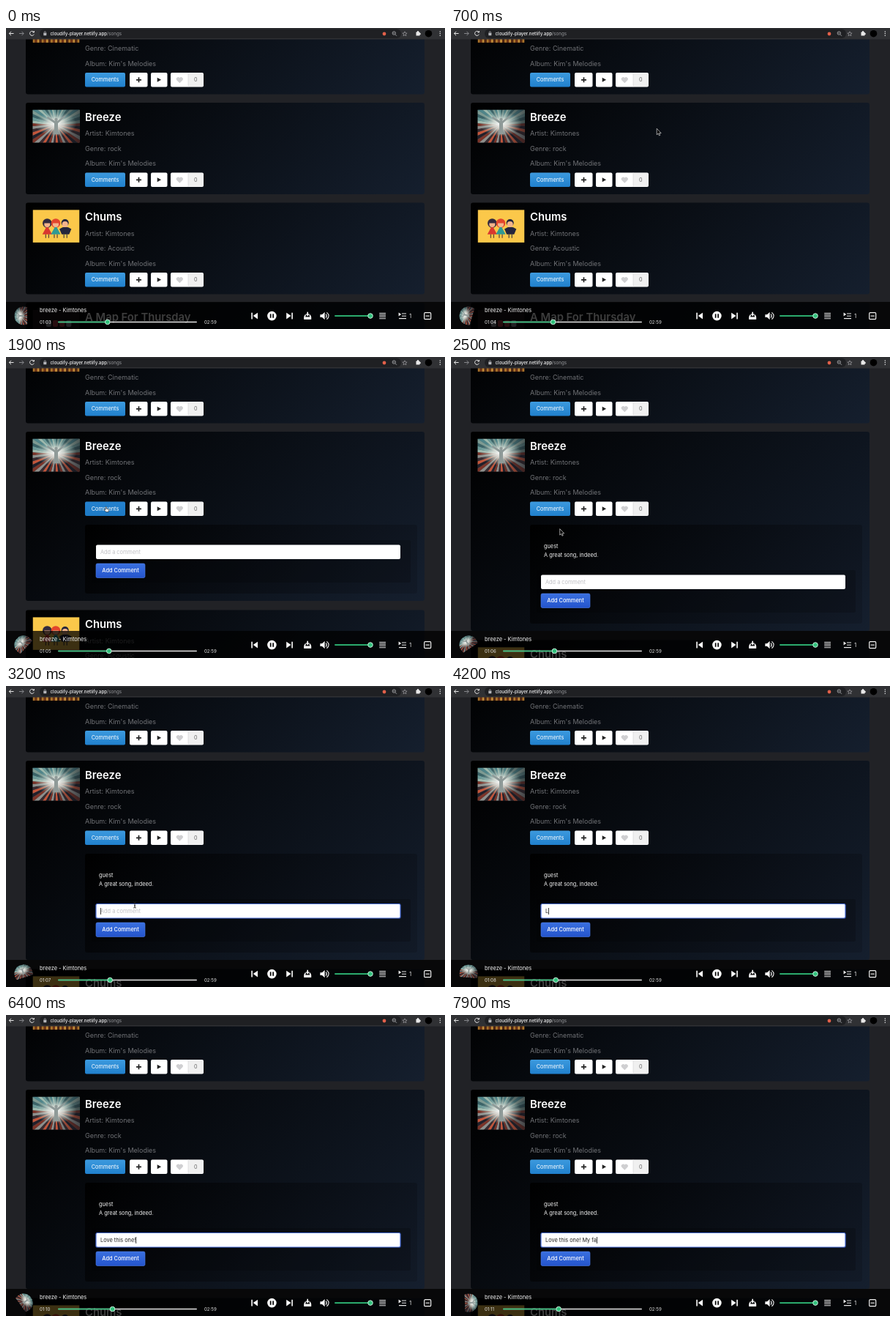
Write an HTML page that moves like this. It is 600 px wide and 411 px high and loops after 8000 ms.

```html
<!DOCTYPE html>
<html lang="en">
<head>
<meta charset="utf-8">
<title>Music player</title>
<style>
html, body { margin: 0; width: 100%; height: 100%; overflow: hidden; background: #212226; }
svg { display: block; }
text { font-family: Inter, "Open Sans", sans-serif; white-space: pre; }
.line { fill: none; stroke: #e8e8e8; stroke-width: 1; }
</style>
</head>
<body>
<svg id="stage" width="600" height="411" viewBox="0 0 600 411"></svg>
<script>
const LOOP = 8000, STEP = 100;
const OPENED = 1900, LOADED = 2200, FOCUSED = 2900, TYPING = 4100;
const ARTIST = 'Kimtones', ALBUM = "Kim's Melodies";
const MESSAGE = 'Love this one! My fa';
const TRACK = { x: 71, width: 190, length: 179, start: 63.85 };

const range = n => [...Array(n).keys()];

// y is the middle of the capital letters
const text = (x, y, size, fill, str, attrs = '') =>
  `<text x="${x}" y="${y + size * .364}" font-size="${size}" fill="${fill}" ${attrs}>${str}</text>`;
const rect = (x, y, w, h, fill, rx = 0, attrs = '') =>
  `<rect x="${x}" y="${y}" width="${w}" height="${h}" rx="${rx}" fill="${fill}" ${attrs}/>`;
const circle = (x, y, r, fill, attrs = '') =>
  `<circle cx="${x}" cy="${y}" r="${r}" fill="${fill}" ${attrs}/>`;
const path = (d, fill, attrs = '') => `<path d="${d}" fill="${fill}" ${attrs}/>`;
const line = (d, attrs = '') => `<path class="line" d="${d}" ${attrs}/>`;

// A 135 degree gradient across a box of the given size
function diagonal(id, w, h, from, to) {
  const c = (w + h) / 4;
  return `<linearGradient id="${id}" gradientUnits="userSpaceOnUse" x1="${w / 2 - c}" y1="${h / 2 - c}"
    x2="${w / 2 + c}" y2="${h / 2 + c}"><stop stop-color="${from}"/><stop offset="1" stop-color="${to}"/></linearGradient>`;
}
const vertical = (id, from, to) =>
  `<linearGradient id="${id}" x2="0" y2="1"><stop stop-color="${from}"/><stop offset="1" stop-color="${to}"/></linearGradient>`;
const picture = (id, body) => `<symbol id="${id}" viewBox="0 0 63 44">${body}</symbol>`;

function burst() {
  const warm = ['#7c3328', '#23202a', '#c4553a', '#3a2b30', '#8f8f8c'];
  const cool = ['#4f858a', '#9db9ad', '#6c9a98', '#3c6468', '#7d9a92'];
  const n = 50;
  const rays = range(n).map(i => {
    const [a, b] = [i - .5, i + .5].map(k => k * 2 * Math.PI / n);
    const point = k => `${31 + 60 * Math.cos(k)} ${20 + 60 * Math.sin(k)}`;
    const set = Math.sin((a + b) / 2) > -.05 ? warm : cool;
    return path(`M31 20L${point(a)}L${point(b)}Z`, set[i % 5]);
  }).join('');
  return rect(0, 0, 63, 44, '#3c6468') + rays + rect(0, 0, 63, 44, 'url(#dusk)') +
    '<ellipse cx="31" cy="19" rx="28" ry="17" fill="url(#glow)"/>' +
    path('M19 11L29 18V26L27 33H36L34 26V18L44 9L43 8L33 15H30L20 9Z', '#8f9a98') + circle(31.5, 13, 2.2, '#8f9a98');
}

function friends() {
  const person = (x, hair, body) =>
    circle(x, 18, 6.2, hair) + path(`M${x} 21L${x + 6.5} 33H${x - 6.5}Z`, body) +
    circle(x, 19.5, 4, '#f3b48b') + path(`M${x - 4} 18a4 4 0 0 1 8 0Z`, hair) +
    line(`M${x - 2} 33v5M${x + 2} 33v5`, 'style="stroke:#3b2b35"');
  return rect(0, 0, 63, 44, '#fbc84a') + person(19.5, '#332b3e', '#d9382f') + person(31, '#e2462c', '#2f9a94') +
    path('M36 26Q44 20 52 26L49 33H39Z', '#24263c') + circle(43.5, 17.5, 5, '#24263c') + circle(43.5, 19.5, 4, '#f3b48b') +
    line('M42 33v5M46 33v5', 'style="stroke:#24263c"');
}

const city = () => rect(0, 0, 63, 44, '#3a1d0d') +
  range(21).map(i => rect(i * 3, 26 + i * 7 % 13, 3, 20, ['#a8722a', '#6e3316', '#c08a38', '#4c2412'][i % 4])).join('');
const puzzle = () => rect(0, 0, 63, 44, '#1a1214') +
  range(8).map(i => rect(18 + i % 4 * 9, 14 + (i >> 2) * 13, 7, 9, i % 3 ? '#a83a44' : '#8d8d98', 2)).join('');

const defs = `<defs>
  ${[125, 231, 272].map(h => diagonal('card' + h, 545, h, '#000', '#151f2e')).join('')}
  ${[94, 135].map(h => diagonal('panel' + h, 454, h, '#000', '#121a27')).join('')}
  ${vertical('blue', '#3d9ade', '#2080cd')}${vertical('hover', '#2582cf', '#1c79c4')}${vertical('royal', '#3a70df', '#2454cc')}
  <linearGradient id="dusk"><stop offset=".5" stop-color="#14161c" stop-opacity="0"/><stop offset="1" stop-color="#14161c" stop-opacity=".6"/></linearGradient>
  <radialGradient id="glow"><stop stop-color="#fff"/><stop offset=".4" stop-color="#e6e8e0" stop-opacity=".8"/>
    <stop offset="1" stop-color="#a9c4bc" stop-opacity="0"/></radialGradient>
  <clipPath id="disc"><circle r="12.5"/></clipPath>
  ${picture('burst', burst())}${picture('friends', friends())}${picture('city', city())}${picture('puzzle', puzzle())}
</defs>`;

function card(y, title, genre, art, id) {
  const white = (x, w) => rect(x, 95.5, w, 19.5, '#fff', 2);
  const details = [`Artist: ${ARTIST}`, `Genre: ${genre}`, `Album: ${ALBUM}`];
  return `<g transform="translate(27 ${y})">
    <rect id="${id}" width="545" height="125" rx="3" fill="url(#card125)"/>
    <use href="#${art}" x="9.5" y="9.7" width="64" height="44.7"/>
    ${text(81, 19.5, 14.8, '#fff', title, 'font-weight="600"')}
    ${details.map((s, i) => text(81, 42 + i * 20.4, 9, '#707276', s)).join('')}
    ${rect(81, 95.5, 55, 19.5, 'url(#blue)', 2, `id="${id}Button"`)}
    ${text(108.5, 105.2, 7.4, '#fff', 'Comments', 'text-anchor="middle"')}
    ${white(142, 24.5)}${white(171, 22.5)}${white(198, 45)}
    ${rect(222, 96, 20.5, 18.5, '#f0f0f0', 2)}${rect(221.7, 95.5, .6, 19.5, '#d2d2d4')}
    ${path('M154.5 101.8v7M151 105.3h7', 'none', 'stroke="#222" stroke-width="1.7"')}
    ${path('M179.7 102.3l5.4 3-5.4 3Z', '#222')}
    ${path('M210.3 109.8l-4-4a2.3 2.3 0 0 1 4-3.2a2.3 2.3 0 0 1 4 3.2Z', '#cfcfd1')}
    ${text(232.3, 105.2, 7.2, '#666', '0', 'text-anchor="middle"')}
  </g>`;
}

const comments = `<g id="panel" transform="translate(108 229)">
    <rect id="panelBox" width="454" height="94" rx="3"/>
    <g id="posted">${text(19, 29, 7.35, '#f2f2f2', 'guest')}${text(19, 41, 7.35, '#f2f2f2', 'A great song, indeed.')}</g>
    <g id="form">
      ${rect(9, 21, 436, 58, '#000', 2, 'opacity=".2"')}
      ${rect(15, 27.5, 416, 19.5, '#fff', 2, 'id="field"')}
      ${text(21, 37.5, 7.35, '#bfbfc3', 'Add a comment', 'id="hint"')}
      ${text(21, 37.5, 7.35, '#222', '', 'id="typed"')}
      ${rect(0, 33, .8, 9, '#111', 0, 'id="caret"')}
      ${rect(15, 53, 67, 19.5, 'url(#royal)', 2, 'stroke="#4d7de6" stroke-width=".6"')}
      ${text(48.5, 62.8, 7.35, '#fff', 'Add Comment', 'text-anchor="middle" font-weight="500"')}
    </g>
  </g>`;

const browser = `<g>
    ${rect(0, 0, 600, 15.5, '#303134')}${rect(46, 1.5, 494, 12.5, '#1f2023', 6)}
    ${line('M10.5 7.5h-6M7 4.8L4.3 7.5L7 10.2')}
    ${line('M18 7.5h6M21.5 4.8L24.2 7.5L21.5 10.2', 'style="stroke:#85868a"')}
    ${line('M38 5.6A3 3 0 1 0 38.3 8.6M38.4 4v2h-2')}
    ${rect(51.3, 6.8, 4, 3.4, '#b5b6ba', .5)}${line('M52.2 7V5.8a1.1 1.1 0 0 1 2.2 0V7', 'style="stroke:#b5b6ba;stroke-width:.7"')}
    ${text(60.5, 7.6, 6.2, '#f1f1f2', 'cloudify-player.netlify.app<tspan fill="#96979b" font-weight="400">/songs</tspan>', 'font-weight="500"')}
    ${circle(517, 8, 2.4, '#e2604a')}
    ${circle(530.3, 7, 2.2, 'none', 'stroke="#b4b5b9" stroke-width=".8"')}${line('M532 8.8l2 2M529.3 7h2', 'style="stroke:#b4b5b9;stroke-width:.8"')}
    ${path('M545 4.8l.9 2.1 2.2.2-1.7 1.4.5 2.2-1.9-1.2-1.9 1.2.5-2.2-1.7-1.4 2.2-.2Z', 'none', 'stroke="#a2a3a7" stroke-width=".7"')}
    ${rect(560.5, 5.6, 5, 5, '#e8e8e8', .6)}${circle(563, 5.2, 1.2, '#e8e8e8')}${circle(565.6, 8, 1.2, '#e8e8e8')}
    ${circle(577.5, 7.7, 4.8, '#000')}
    ${[5, 7.6, 10.2].map(y => circle(593.3, y, .75, '#e8e8e8')).join('')}
  </g>`;

const knob = (x, y, id) => circle(x, y, 3.3, '#31c27c', `id="${id}" stroke="#d9f5e7" stroke-width=".9"`);
const player = `<g>
    ${rect(0, 374, 600, 37, '#000', 0, 'opacity=".76"')}
    <g transform="translate(24 393)"><g id="spin"><g clip-path="url(#disc)">
      <use href="#burst" x="-12.5" y="-12.5" width="25" height="17.5"/></g></g></g>
    ${text(46, 385.2, 7.4, '#f4f4f4', `breeze - ${ARTIST}`)}
    ${text(46, 401.7, 6.1, '#e4e4e4', '', 'id="clock"')}${text(271, 401.7, 6.1, '#e4e4e4', '02:59')}
    ${rect(TRACK.x, 400.7, TRACK.width, 1.6, '#e4e4e4', .8)}${rect(TRACK.x, 400.7, 0, 1.6, '#31c27c', .8, 'id="played"')}
    ${knob(0, 401.5, 'head')}
    ${path('M344 388.8v8.6L337.7 393.1ZM335.3 388.8h1.6v8.6h-1.6Z', '#fff')}
    ${path('M383.2 388.8v8.6l6.3-4.3ZM390.3 388.8h1.6v8.6H390.3Z', '#fff')}
    ${circle(363.4, 393.1, 6.3, '#fff')}${rect(360.8, 390.4, 1.7, 5.4, '#000')}${rect(364.3, 390.4, 1.7, 5.4, '#000')}
    ${path('M408.5 391.6h1.6l-1 2.8h6.2l-1-2.8h1.6l1.3 3v3.4h-10v-3.4Z', '#fff')}
    ${path('M411.4 387.8h1.6v2.8h1.9l-2.7 3-2.7-3h1.9Z', '#fff')}
    ${path('M429.4 391.2h2.6l3.6-3.2v10.2l-3.6-3.2h-2.6Z', '#fff')}
    ${line('M437.2 390.6q2 2.5 0 5M438.4 388.4q5.4 4.7 0 9.4', 'style="stroke-width:1.2"')}
    ${rect(449, 392.3, 49, 1.6, '#31c27c', .8)}${knob(498, 393.1, 'volume')}
    ${line(range(4).map(i => `M510.2 ${389.5 + i * 2.4}h8.8`).join(''), 'style="stroke-width:1.1"')}
    ${line('M541 390h6M541 393.2h6M537 396.6h10', 'style="stroke-width:1.1"')}${path('M536.6 388.4l3.6 2.6-3.6 2.6Z', '#fff')}
    ${text(551.3, 393.2, 7, '#fff', '1')}
    ${rect(571.7, 388.7, 9, 9, 'none', 1.3, 'stroke="#f0f0f0" stroke-width="1.2"')}${line('M573.6 393.2h5.2', 'style="stroke-width:1.2"')}
  </g>`;

const outlined = (fill, edge) => `stroke="${edge}" stroke-width=".6" stroke-linejoin="round" fill="${fill}"`;
const pointer = `<g id="pointer">
    <path id="arrow" d="M0 0V8.4L1.9 6.7L3.2 9.6L4.5 9L3.3 6.2H5.9Z" ${outlined('#000', '#fff')}/>
    <path id="hand" d="M-1 -2.4Q-.3 -3.2 .3 -2.2V.2L3.2 .9Q3.9 1.2 3.7 2L3.1 4.6H-.4L-2.8 1.7Q-2.6 .8 -1 1.6Z" ${outlined('#fff', '#111')}/>
    <path id="beam" d="M-1.8 -4Q0 -4 0 -3V3Q0 4 -1.8 4M1.8 -4Q0 -4 0 -3M0 3Q0 4 1.8 4M-1 1H1" fill="none" stroke="#222" stroke-width=".9"/>
  </g>`;

const $ = id => document.getElementById(id);
$('stage').innerHTML = defs + rect(0, 0, 600, 411, '#212226') +
  card(-34.5, 'Skyline', 'Cinematic', 'city', 'first') +
  card(102, 'Breeze', 'rock', 'burst', 'main') + comments +
  `<g id="below">${card(238.5, 'Chums', 'Acoustic', 'friends', 'third')}
    ${card(375, 'A Map For Thursday', 'Acoustic', 'puzzle', 'fourth')}</g>` +
  browser + player + pointer;

const set = (id, attrs) => Object.entries(attrs).forEach(([k, v]) => $(id).setAttribute(k, v));
const show = (id, on) => set(id, { display: on ? 'inline' : 'none' });

// Pointer stops: time, x, y
const STOPS = [[100, 545, 9], [1100, 138, 207], [1800, 137, 207], [2300, 137, 207], [2850, 176, 299], [LOOP, 176, 299]];
function pointerAt(t) {
  const i = Math.max(1, STOPS.findIndex(s => s[0] > t));
  const [a, b] = [STOPS[i - 1], STOPS[i]];
  const k = Math.min(1, Math.max(0, (t - a[0]) / (b[0] - a[0])));
  const ease = k * k * (3 - 2 * k);
  return [1, 2].map(j => a[j] + (b[j] - a[j]) * ease);
}

function typedCount(t) {
  if (t < TYPING) return 0;
  if (t < 6600) return Math.min(14, 1 + Math.floor((t - TYPING) / 165));
  return Math.min(MESSAGE.length, 14 + Math.floor((t - 6600) / 210));
}

function drawComments(t) {
  const open = t >= OPENED, loaded = t >= LOADED, focused = t >= FOCUSED;
  const [cardHeight, panelHeight, shift] = loaded ? [272, 135, 148] : open ? [231, 94, 107] : [125, 94, 0];
  set('main', { height: cardHeight, fill: `url(#card${cardHeight})` });
  set('panelBox', { height: panelHeight, fill: `url(#panel${panelHeight})` });
  set('below', { transform: `translate(0 ${shift})` });
  set('form', { transform: `translate(0 ${loaded ? 41 : 0})` });
  show('panel', open);
  show('posted', loaded);

  const count = typedCount(t);
  $('typed').textContent = MESSAGE.slice(0, count);
  show('hint', !count);
  set('field', { stroke: focused ? '#4a6fdc' : 'none', 'stroke-width': 1.2 });
  set('caret', { x: 21 + (count ? $('typed').getComputedTextLength() : 0) });
  show('caret', focused && (count || (t - FOCUSED) % 1000 < 500));
}

function drawPlayer(t) {
  const seconds = TRACK.start + t / 1000;
  const done = TRACK.width * seconds / TRACK.length;
  $('clock').textContent = '01:' + String(Math.floor(seconds) - 60).padStart(2, '0');
  set('played', { width: done });
  set('head', { cx: TRACK.x + done });
  set('spin', { transform: `rotate(${(t - 4000) * .0225})` });
}

function drawPointer(t) {
  const [x, y] = pointerAt(t);
  const onButton = x > 108 && x < 163 && y > 197 && y < 217;
  const onField = t >= LOADED && y > 297;
  set('pointer', { transform: `translate(${x} ${y})` });
  show('pointer', t >= 100 && t < TYPING);
  show('hand', onButton);
  show('beam', onField);
  show('arrow', !onButton && !onField);
  set('mainButton', { fill: onButton && t >= 100 ? 'url(#hover)' : 'url(#blue)' });
}

const begin = performance.now();
function frame() {
  const t = Math.floor((performance.now() - begin) % LOOP / STEP) * STEP;
  drawComments(t);
  drawPlayer(t);
  drawPointer(t);
  requestAnimationFrame(frame);
}
frame();
</script>
</body>
</html>
```
